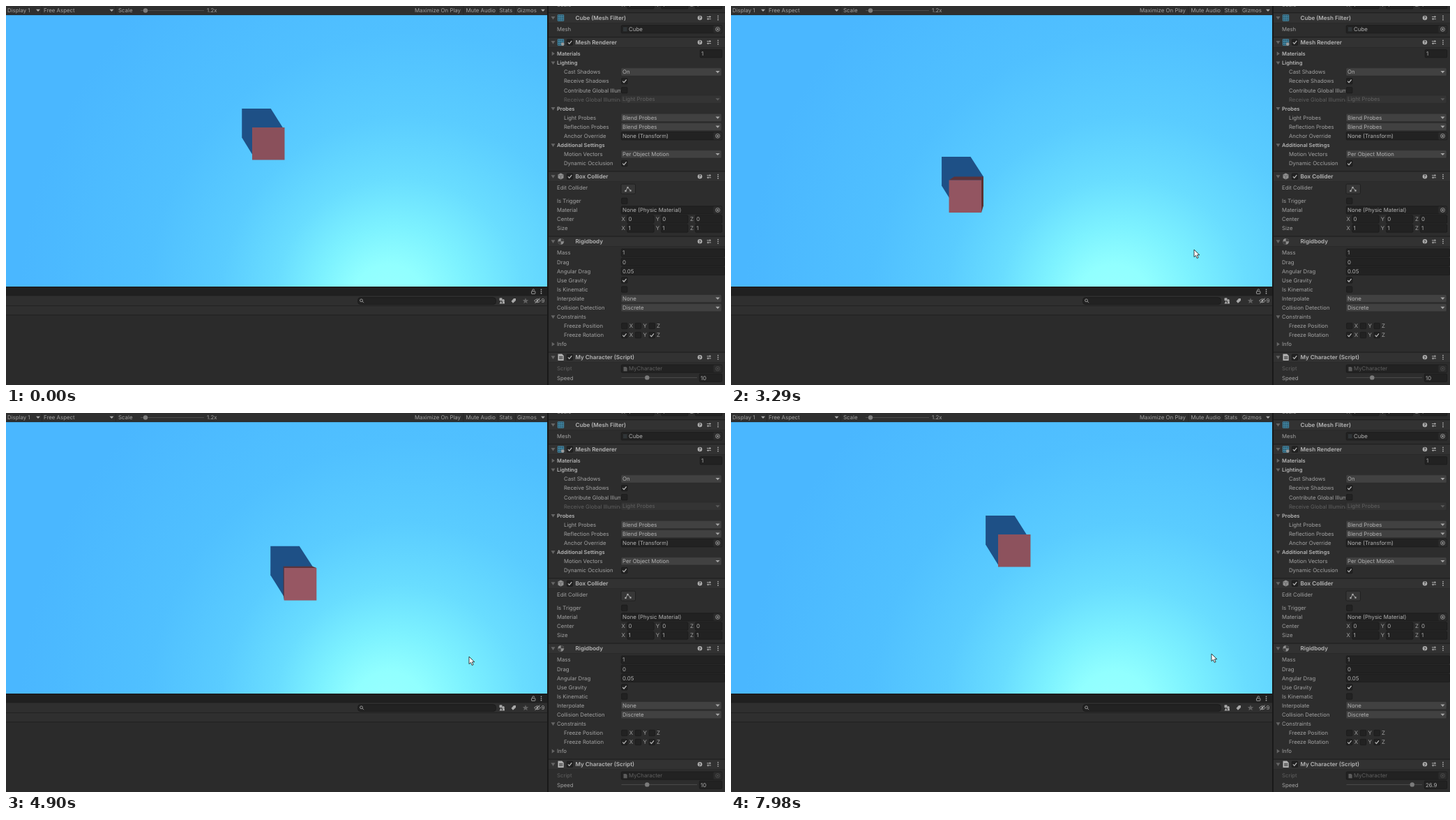
Write an HTML page that moves like this. It is 1031 px wide and 543 px high and loops after 8000 ms.

```html
<!DOCTYPE html>
<html lang="en">
<head>
<meta charset="utf-8">
<title>Moving cube</title>
<style>
html, body { margin: 0; width: 100%; height: 100%; overflow: hidden; background: #2b2b2b; }
svg { display: block; width: 1031px; height: 543px; }
text { font: 400 7.86px Inter, Roboto, sans-serif; fill: #a2a2a2; text-rendering: geometricPrecision; white-space: pre; }
.label { font-size: 7.75px; clip-path: url(#labels); }
.bold { font-size: 7.5px; font-weight: 600; fill: #b6b6b6; }
.head { font-size: 8.1px; font-weight: 600; fill: #b6b6b6; }
.value { fill: #b2b2b2; }
.dim { fill: #606060; }
</style>
</head>
<body>
<svg id="stage" viewBox="0 0 1031 543" xmlns="http://www.w3.org/2000/svg"></svg>
<script>
const out = [];
const add = s => out.push(s);
const rect = (x, y, w, h, fill, rx = 0, more = '') =>
  add(`<rect x="${x}" y="${y}" width="${w}" height="${h}" rx="${rx}" fill="${fill}" ${more}/>`);
const path = (d, fill, more = '') => add(`<path d="${d}" fill="${fill}" ${more}/>`);
const line = (d, color = '#a8a8a8', w = .9) => path(d, 'none', `stroke="${color}" stroke-width="${w}"`);
const disc = (x, y, r, fill, more = '') => add(`<circle cx="${x}" cy="${y}" r="${r}" fill="${fill}" ${more}/>`);
const ring = (x, y, r, color = '#a8a8a8') => disc(x, y, r, 'none', `stroke="${color}" stroke-width=".9"`);
const text = (x, y, s, cls = '', id = '') =>
  add(`<text x="${x}" y="${y + 2.8}" class="${cls}" id="${id}">${s}</text>`);
const arrow = (x, y, c = '#a8a8a8') => path(`M${x - 3} ${y - 1.5}h6l-3 3.2z`, c);
const kebab = (x, y) => [-2.7, 0, 2.7].forEach(d => disc(x, y + d, .85, '#b4b4b4'));
const slider = (x, y, w, at, id = '') => {
  rect(x, y - .5, w, 1, '#4c4c4c');
  disc(at, y, 3.2, '#7c7c7c', `id="${id}"`);
};

// Game view
add(`<defs><radialGradient id="sky" gradientUnits="userSpaceOnUse" cx="615" cy="424" r="595" fx="542" fy="424">
<stop offset="0" stop-color="#98ffff"/><stop offset=".09" stop-color="#91ffff"/>
<stop offset=".18" stop-color="#7df2ff"/><stop offset=".3" stop-color="#69ddff"/>
<stop offset=".45" stop-color="#5accff"/><stop offset=".65" stop-color="#50c0ff"/>
<stop offset="1" stop-color="#4ab7ff"/></radialGradient>
<clipPath id="view"><path d="M0 13h776v389H0z"/></clipPath>
<clipPath id="labels"><path d="M778 0h103.5v543H778z"/></clipPath></defs>`);
rect(0, 13, 776, 389, 'url(#sky)');
add('<g id="cube" clip-path="url(#view)"></g>');

// Game toolbar
rect(0, 0, 776, 13, '#2f2f2f');
rect(0, 12.4, 776, .7, '#1f2a30');
Object.entries({ 'Display 1': 2, 'Free Aspect': 54, 'Scale': 161, '1.2x': 288,
  'Maximize On Play': 586, 'Mute Audio': 659.5, 'Stats': 707.5, 'Gizmos': 733 })
  .forEach(([s, x]) => text(x, 6.3, s));
[46, 151.5, 770].forEach(x => arrow(x, 6.3));
[51, 157, 655.5, 705, 730].forEach(x => rect(x, 0, .7, 12.5, '#252525'));
slider(193, 6.5, 91, 200);

// Lower panel
rect(0, 402, 776, 141, '#2b2b2b');
rect(0, 402, 776, 13.5, '#202020');
rect(0, 402, 776, 1, '#161616');
rect(0, 415.5, 776, 27, '#2f2f2f');
[429, 442.4].forEach(y => rect(0, y, 776, .8, '#1f1f1f'));
rect(753.5, 408.7, 5.4, 3.6, 'none', .5, 'stroke="#a8a8a8" stroke-width=".9"');
line('M754.8 408.5v-1.2a1.5 1.5 0 0 1 3 0');
kebab(767.5, 409);
rect(504.5, 417.6, 198, 10, '#222', 4, 'stroke="#181818" stroke-width=".7"');
ring(509.5, 421.8, 1.9);
line('M511 423.2l2 2');
rect(707.5, 418.2, 4, 4, '#a8a8a8', .8);
disc(713, 422, 1.9, '#a8a8a8');
path('M707.5 426.5l2.2 -4 2.2 4zM712 423.5h3v3h-3z', '#a8a8a8');
path('M724.5 423l3.5 -4h3v3l-4 3.8z', '#a8a8a8');
path('M745 418.2l1.2 2.8 3 .2 -2.3 2 .8 3 -2.7 -1.7 -2.7 1.7 .8 -3 -2.3 -2 3 -.2z', '#626262');
line('M757.5 422.3q4.5 -5 9 0q-4.5 5 -9 0zM758.5 426l7 -7.5');
disc(762, 422.3, 1.4, '#a8a8a8');
text(767.5, 422.4, '9');

// Inspector: y is the middle of the current row and moves down as rows are added
const pitch = 13.1;
let y = -1.7;
rect(776, 0, 255, 543, '#2d2d2d');
rect(776, 0, 2, 543, '#191919');

const fold = (open = true, x = 784.5) =>
  path(open ? `M${x - 3} ${y - 2}h6l-3 4.6z` : `M${x - 1.8} ${y - 3}v6l4.2 -3z`, '#656565');
const row = (s, x = 790, cls = '') => {
  y += pitch;
  text(x, y, s, 'label ' + cls);
};
const group = (s, open = true, cls = 'bold') => {
  row(s, 790, cls);
  fold(open);
};
const field = (x, w, s, dx = 2, cls = 'value', id = '') => {
  rect(x + .3, y - 5.7, w - .6, 11.4, '#222', 1.5, 'stroke="#191919" stroke-width=".6"');
  text(x + dx, y, s, cls, id);
};
const pick = (s, dx, dim) => {
  const c = dim ? '#4e4e4e' : '#9c9c9c';
  field(882, 145, s, dx, dim ? 'dim' : 'value');
  rect(1014.5, y - 5.2, 12, 10.4, '#2c2c2c', 1);
  ring(1020.5, y, 2.9, c);
  disc(1020.5, y, 1.2, c);
};
const drop = (s, dim) => {
  rect(882, y - 5.7, 144, 11.2, dim ? '#343434' : '#414141', 1.5, 'stroke="#2a2a2a" stroke-width=".5"');
  text(884, y - .3, s, dim ? 'dim' : 'value');
  arrow(1020.5, y, dim ? '#5c5c5c' : '#a8a8a8');
};
const check = (on, x = 886.8) => {
  rect(x - 4.2, y - 4.2, 8.4, 8.4, '#222', 1.2, 'stroke="#181818" stroke-width=".6"');
  if (on) line(`M${x - 2.6} ${y + .1}l1.9 2 3.5 -4.2`, '#bdbdbd', 1.2);
};
const axes = draw => ['X', 'Y', 'Z'].forEach(draw);
const vector = v => axes((s, i) => {
  text(882.5 + i * 49.2, y, s);
  field(890.5 + i * 48.8, 39, v);
});
const freeze = on => axes((s, i) => {
  check(on.includes(s), 886.8 + i * 19.7);
  text(893.7 + i * 19.7, y, s);
});
const grid = () => {
  rect(791.3, y - 4.2, 8.4, 8.4, '#294a59');
  for (let k = 0; k < 9; k += 2.8) line(`M${791.3 + k} ${y - 4.2}v8.4M791.3 ${y - 4.2 + k}h8.4`, '#4b9fc2', .8);
};
const header = (s, icon, on) => {
  y += 18.7;
  rect(778, y - 7.2, 253, 14.4, '#323232');
  rect(778, y - 7.7, 253, .9, '#1b1b1b');
  rect(778, y + 7, 253, .6, '#272727');
  fold();
  icon();
  if (on) check(true, 808.5);
  text(816.5, y, s, 'head');
  disc(995, y, 3.3, '#acacac');
  add(`<text x="995" y="${y + 2.2}" text-anchor="middle" style="font-size:6px;font-weight:700;fill:#323232">?</text>`);
  line(`M1005 ${y - 1.5}h6M1005 ${y + 1.6}h6M1009.3 ${y - 3}v3M1006.7 ${y + .1}v3`, '#b0b0b0');
  kebab(1021, y);
  y += 3.2;
};

text(790, y, 'Scale');
vector('1');

header('Cube (Mesh Filter)', grid);
row('Mesh');
pick('Cube', 11);
line(`M885 ${y - 2}h5.5m-5.5 2h5.5m-5.5 2h5.5`, '#4d5a60', .7);

header('Mesh Renderer', () => {
  grid();
  disc(798.2, y + 2.6, 2.3, '#9b9b9b');
}, true);
group('Materials', false);
field(995, 32, '1');
group('Lighting');
row('Cast Shadows', 800);
drop('On');
row('Receive Shadows', 800);
check(true);
row('Contribute Global Illumination', 800);
check();
row('Receive Global Illumination', 800, 'dim');
drop('Light Probes', true);
group('Probes');
row('Light Probes', 800);
drop('Blend Probes');
row('Reflection Probes', 800);
drop('Blend Probes');
row('Anchor Override', 800);
pick('None (Transform)');
group('Additional Settings');
row('Motion Vectors', 800);
drop('Per Object Motion');
row('Dynamic Occlusion', 800);
check(true);

header('Box Collider', () => {
  path(`M795.5 ${y - 4.6}l4 2v4.8l-4 2.2 -4 -2.2v-4.8z`, '#8e8e8e');
  line(`M791.5 ${y - 2.5}l4 2 4 -2m-4 2v4.7`, '#5e5e5e', .7);
}, true);
row('Edit Collider');
rect(882, y - 5.3, 20.5, 13.8, '#373737', 1.5, 'stroke="#1c1c1c" stroke-width=".7"');
line(`M888.5 ${y + 4.5}l3 -5 4 4.500`, '#b0b0b0');
[[888, 4], [891, -1], [895, 3.5]].forEach(([x, dy]) => rect(x - .6, y + dy - .6, 2.2, 2.2, '#b0b0b0'));
y += 5.7;
row('Is Trigger');
check();
row('Material');
pick('None (Physic Material)');
row('Center');
vector('0');
row('Size');
vector('1');

header('Rigidbody', () => {
  disc(795.7, y, 4.4, '#8e8e8e');
  path(`M795.7 ${y}v-4.4a4.4 4.4 0 0 1 4.4 4.4zv4.4a4.4 4.4 0 0 1 -4.4 -4.4z`, '#3f3f3f');
});
Object.entries({ 'Mass': '1', 'Drag': '0', 'Angular Drag': '0.05' }).forEach(([s, v]) => {
  row(s);
  field(882, 149, v);
});
row('Use Gravity');
check(true);
row('Is Kinematic');
check();
row('Interpolate');
drop('None');
row('Collision Detection');
drop('Discrete');
group('Constraints', true, '');
row('Freeze Position', 800);
freeze('');
row('Freeze Rotation', 800);
freeze('XZ');
group('Info', false, '');

header('My Character (Script)', () => {
  path(`M791.5 ${y - 4.7}h5.7l2.5 2.5v7h-8.2z`, '#b4b4b4');
  line(`M794.5 ${y - 2}v5m2.5 -5v5M793 ${y - .5}h5.5m-5.5 2.2h5.5`, '#3c3c3c', .8);
}, true);
row('Script', 790, 'dim');
pick('MyCharacter', 11, true);
path(`M885.5 ${y - 2.7}h3.6l1.6 1.6v4.8h-5.2z`, '#5c5c5c');
row('Speed');
slider(882.5, y - .3, 108.5, 919.3, 'knob');
field(994, 33, '10', 2, 'value', 'speed');
add(`<path id="mouse" d="M0 0v10.6l2.5 -2.2 1.7 4 1.9 -.8 -1.7 -3.9h3.4z" fill="#fff" stroke="#111" stroke-width=".8"/>`);

const $ = id => document.getElementById(id);
$('stage').innerHTML = out.join('');

// Turning points [time, value...]; each leg between two of them is a half cosine
const swingX = [[2370, 353], [2920, 210], [3786, 474], [4430, 254], [4930, 400], [5330, 272], [5722, 383]];
const swingY = [[2675, 174], [3180, 258], [4000, 69], [4670, 272], [5203, 146], [5500, 174]];
const mouseStops = [[520, 960, 541], [1240, 664, 349], [1310, 664, 349], [1360, 656, 341], [1410, 664, 349],
  [5100, 664, 349], [5738, 890, 534], [6290, 920, 530], [6440, 920, 530], [7210, 977, 530],
  [7780, 682, 330], [7980, 689, 345]];

function swing(keys, t) {
  const i = Math.max(1, keys.findIndex(k => k[0] > t));
  const last = t >= keys[keys.length - 1][0];
  const [a, b] = last ? keys.slice(-2) : [keys[i - 1], keys[i]];
  const u = Math.min(1, Math.max(0, (t - a[0]) / (b[0] - a[0])));
  const e = (1 - Math.cos(Math.PI * u)) / 2;
  return a.slice(1).map((v, k) => v + (b[k + 1] - v) * e);
}

const poly = (pts, fill) => `<polygon points="${pts.map(p => p.map(v => v.toFixed(2))).join(' ')}" fill="${fill}"/>`;
const corners = (x, y, s) => [[x, y], [x + s, y], [x + s, y + s], [x, y + s]];

function drawCube(x, y) {
  const cx = 388, cy = 199, size = 46.5, depth = .9;
  const front = corners(x, y, size);
  const back = front.map(([px, py]) => [cx + (px - cx) * depth, cy + (py - cy) * depth]);
  const far = corners(221 + .895 * (x - 222), 147 + .912 * (y - 174), 41.5);
  const side = (i, j, fill) => poly([front[i], front[j], back[j], back[i]], fill);
  const lit = 1 + ((x - 353) * .1 + (y - 174) * .17) / 139;
  let s = poly([far[0], far[1], back[1], back[2], back[3], far[3]], '#1e5086');
  if (x > cx) s += side(0, 3, '#552c2f');
  if (x + size < cx) s += side(1, 2, '#5e302f');
  if (y > cy) s += side(0, 1, '#5c333b');
  if (y + size < cy) s += side(3, 2, '#804448');
  s += poly(front, `rgb(${[138, 80, 91].map(v => Math.round(v * lit))})`);
  $('cube').innerHTML = s;
}

function draw(t) {
  drawCube(swing(swingX, t)[0], swing(swingY, t)[0]);
  $('mouse').setAttribute('transform', `translate(${swing(mouseStops, t)})`);
  $('mouse').style.display = t < 520 ? 'none' : '';
  const drag = swing([[6440, 0], [7210, 1]], t)[0];
  const speed = 10 + 16.9 * drag;
  $('knob').setAttribute('cx', 885.3 + 3.4 * speed);
  $('speed').textContent = +speed.toFixed(1);
}

function tick() {
  draw(performance.now() % 8000);
  requestAnimationFrame(tick);
}
tick();
</script>
</body>
</html>
```
